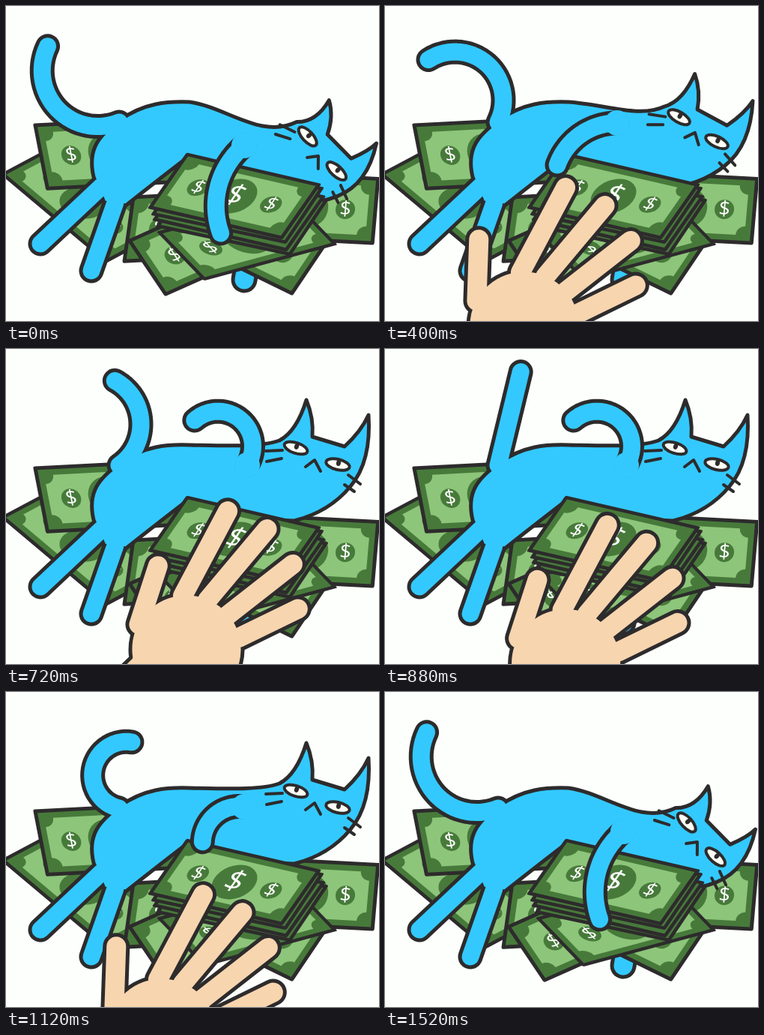
These frames come from a looping animation (498 by 420 pixels, 1.6 s). An HTML page with a canvas:

```html
<!DOCTYPE html>
<html>
<head>
<meta charset="utf-8">
<style>
  html, body { margin: 0; width: 100%; height: 100%; overflow: hidden; background: #fdfffc; }
  canvas { display: block; }
</style>
</head>
<body>
<canvas id="stage" width="498" height="420"></canvas>
<script>
const ctx = document.getElementById('stage').getContext('2d');
const INK = '#2d2b2c', BLUE = '#33c9ff', SKIN = '#f7d5af', DARK = '#477a3a', LIGHT = '#8dc57a';
const LOOP = 1600, STEP = 80, SWING = 1520;

// Arm poses: shoulder x and y, heading at shoulder and paw in degrees, length.
const HUG = [318, 186, 220, 290, 129];
const TUCK = [310, 156, 180, 250, 104];
const RAISE = [322, 155, 57, 222, 134];
const SLAP = [318, 153, 172, 268, 82];
const ARM = [[0, HUG], [160, HUG], [400, TUCK], [720, RAISE], [960, RAISE], [1120, SLAP], [1360, TUCK], [1520, HUG]];

// Hand: palm centre, and how far the thumb folds in.
const HAND = [
  [80, [60, 615, 0]], [400, [186, 427, 0]], [720, [241, 401, 1]], [960, [242, 429, 1]],
  [1120, [208, 455, 0]], [1360, [62, 565, 0]], [1520, [-20, 660, 0]]
];

const rad = deg => deg * Math.PI / 180;
const clamp = v => Math.min(1, Math.max(0, v));
const ramp = (t, from, to) => clamp((t - from) / (to - from));
const wave = (t, peak) => Math.cos((t - peak) / SWING * 2 * Math.PI);
const polar = (x, y, deg, r) => [x + r * Math.cos(rad(deg)), y - r * Math.sin(rad(deg))];

function sample(keys, t) {
  let i = 0;
  while (i < keys.length - 2 && t >= keys[i + 1][0]) i++;
  const [[from, a], [to, b]] = [keys[i], keys[i + 1]];
  return a.map((v, n) => v + (b[n] - v) * ramp(t, from, to));
}

function line(...points) {
  const path = new Path2D();
  points.forEach(p => path.lineTo(...p));
  return path;
}

// A limb whose heading turns evenly from one angle to another.
function bend(x, y, from, to, length) {
  const points = [[x, y]], n = 30;
  for (let i = 0; i < n; i++) {
    points.push(polar(...points[i], from + (to - from) * (i + 0.5) / n, length / n));
  }
  return line(...points);
}

function oval(x, y, rx, ry = rx, angle = 0) {
  const path = new Path2D();
  path.ellipse(x, y, rx, ry, angle, 0, 7);
  return path;
}

function stroke(path, width, color = INK) {
  ctx.lineWidth = width;
  ctx.strokeStyle = color;
  ctx.stroke(path);
}

function fill(path, color) {
  ctx.fillStyle = color;
  ctx.fill(path);
}

// Round limbs merged with a body into one outlined shape.
function figure(limbs, width, color, body) {
  limbs.forEach(l => stroke(l, width));
  if (body) {
    fill(body, color);
    stroke(body, 5);
  }
  limbs.forEach(l => stroke(l, width - 10, color));
}

const paper = new Path2D();
paper.rect(0, 0, 180, 86);
const panel = new Path2D();
[[10, 10], [170, 10], [170, 76], [10, 76]].forEach(([x, y], i) =>
  panel.arc(x, y, 12, rad(90 + 90 * i), rad(90 * i), true));
panel.closePath();

function bill(x, y, angle, skew) {
  ctx.save();
  ctx.translate(x, y);
  ctx.rotate(rad(angle));
  ctx.transform(1, 0, -Math.sin(rad(skew)), Math.cos(rad(skew)), 0, 0);
  fill(paper, DARK);
  fill(panel, LIGHT);
  stroke(paper, 5);
  for (const [cx, r] of [[40, 13], [90, 27], [140, 13]]) {
    fill(oval(cx, 43, r), DARK);
    ctx.fillStyle = '#fff';
    ctx.font = `${14 + r}px "Open Sans", sans-serif`;
    ctx.fillText('$', cx, 44);
  }
  ctx.restore();
}

// Maps head coordinates to the stage; the head tips over as it sinks.
function headFrame(lift) {
  const turn = (1 - lift) * 0.5;
  return new DOMMatrix([Math.cos(turn), Math.sin(turn), -Math.sin(turn), Math.cos(turn),
    422 - 7 * lift, 197 - 54 * lift]);
}

function catBody(lift) {
  const frame = headFrame(lift), droop = 1 - lift;
  const at = (x, y) => {
    const p = frame.transformPoint({ x, y });
    return [p.x, p.y];
  };
  const path = new Path2D();
  const arc = (control, end) => path.quadraticCurveTo(...control, ...end);
  path.moveTo(152, 152);
  path.bezierCurveTo(185, 129, 215, 127, 245, 128);
  path.bezierCurveTo(295, 129 + 6 * droop, 340, 131 + 47 * droop, ...at(-50, -21));
  arc(at(-27, -33), at(-14 - 12 * droop, -75 + 8 * droop));
  arc(at(-4 - 6 * droop, -51), at(-6, -26));
  path.lineTo(...at(37, -13));
  arc(at(59 - 6 * droop, -33), at(69 - 12 * droop, -55 + 8 * droop));
  arc(at(73, 7), at(45, 40));
  arc(at(17, 74), at(-30, 86));
  path.lineTo(270, 225);
  path.lineTo(242, 202);
  path.quadraticCurveTo(190, 242, 160, 266);
  path.lineTo(131, 262);
  path.lineTo(117, 228);
  path.bezierCurveTo(108, 190, 125, 172, 152, 152);
  path.closePath();
  return path;
}

function face(lift) {
  ctx.save();
  const { a, b, c, d, e, f } = headFrame(lift);
  ctx.transform(a, b, c, d, e, f);
  for (const side of [-1, 1]) {
    const x = 28 * side, y = 11 * side, tilt = 0.28 - 0.04 * side;
    const eye = oval(x, y, 16, 7, tilt);
    fill(eye, '#fdfdf4');
    stroke(eye, 4);
    fill(oval(x + 1, y - 2, 3, 4, tilt), INK);
  }
  stroke(line([-15, 14], [-3, 5], [5, 20]), 4);
  stroke(line([-68, -7], [-46, -8]), 4);
  stroke(line([-67, 7], [-47, 3]), 4);
  stroke(line([37, 38], [50, 47]), 4);
  stroke(line([42, 25], [58, 37]), 4);
  ctx.restore();
}

function catTail(t) {
  const base = 122 - 96 * wave(t, 620);
  const tip = 99 + 117 * wave(t, 453);
  return bend(151, 155, base, tip, 156 + 28 * wave(t, 140));
}

function catArm(t) {
  const pose = sample(ARM, t);
  figure([bend(...pose)], 33, BLUE);
  fill(oval(pose[0], pose[1], 17), BLUE);
}

function hand(t) {
  const [x, y, fold] = sample(HAND, t);
  const finger = (spot, heading, length) => {
    const base = polar(0, 0, spot, 72);
    return line(base, polar(...base, heading, length));
  };
  const limbs = [finger(152, 88 - 16 * fold, 82)];
  for (let i = 0; i < 4; i++) limbs.push(finger(94 - 27 * i, 62 - 12 * i, 128 - 4.5 * i * i));
  const palm = new Path2D();
  palm.arc(0, 0, 75, rad(172), rad(375));
  palm.lineTo(-80, 230);
  palm.lineTo(-290, 220);
  palm.closePath();
  ctx.save();
  ctx.translate(x, y);
  figure(limbs, 36, SKIN, palm);
  ctx.restore();
}

function draw(now) {
  const t = Math.floor(now % LOOP / STEP) * STEP;
  const lift = ramp(t, 160, 560) - ramp(t, 1360, 1520);
  ctx.fillStyle = '#fdfffc';
  ctx.fillRect(0, 0, 498, 420);
  ctx.lineCap = ctx.lineJoin = 'round';
  ctx.textAlign = 'center';
  ctx.textBaseline = 'middle';

  bill(72, 184, 40, 22);
  bill(39, 159, -3, -8);
  bill(317, 221, 3, 2);
  bill(170, 255, -3, 11);
  figure([line([318, 365], [323, 335])], 35, BLUE);
  bill(165, 313, -24, -10);
  bill(268, 233, 26, 8);
  bill(205, 302, -15, -29);

  const legs = [line([46, 317], [128, 240]), line([114, 353], [146, 262])];
  figure([catTail(t), ...legs], 33, BLUE, catBody(lift));
  face(lift);
  for (let i = 3; i >= 0; i--) bill(242 + 3 * i, 198 + 8 * i, 13 - i % 2, 22);
  catArm(t);
  if (t >= STEP && t < SWING) hand(t);
  requestAnimationFrame(draw);
}
requestAnimationFrame(draw);
</script>
</body>
</html>
```
